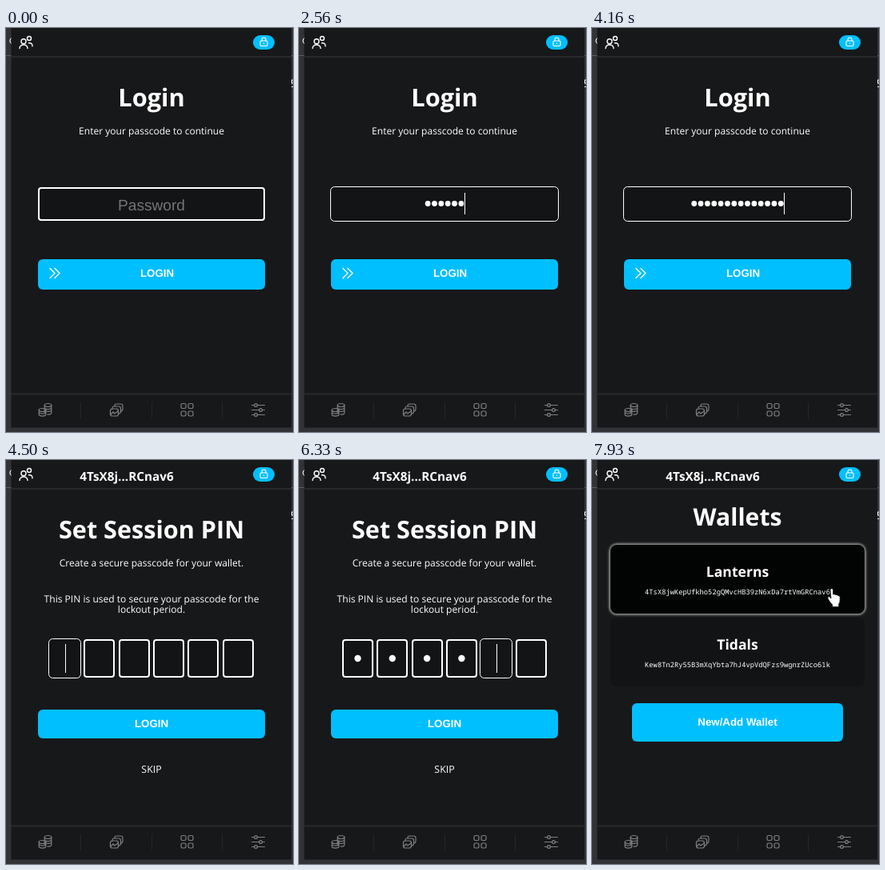
An HTML page that plays this animation: 359 px wide and 505 px high, repeating every 8000 ms.

```html
<!DOCTYPE html>
<html lang="en">
<head>
<meta charset="utf-8">
<title>Wallet login</title>
<style>
  html, body { margin: 0; width: 100%; height: 100%; overflow: hidden; background: #323337; }
  svg { display: block; }
  text { fill: #fff; text-anchor: middle; text-rendering: geometricPrecision; font: 12.07px "Open Sans", sans-serif; }
  .title { font-weight: 700; font-size: 30.8px; }
  .name { font-weight: 700; font-size: 17.6px; }
  .account { font-weight: 700; font-size: 15.3px; }
  .key { font: 500 8.79px "Noto Sans Mono", monospace; }
  .label { font: 700 13.33px "Liberation Sans", Arial, sans-serif; }
  .hint { font: 19.1px "Liberation Sans", Arial, sans-serif; fill: #757575; }
  .button { fill: #00bfff; }
  .line { fill: none; stroke: #fff; stroke-width: 1.4; stroke-linecap: round; stroke-linejoin: round; }
  .thin { stroke-width: 1.1; }
  .nav { stroke: #808080; stroke-width: 1.2; }
  .field { fill: #131416; stroke: #fff; stroke-width: 2; }
  .card { fill: #121315; }
  .dot, .caret { fill: #fff; }
  .cursor { fill: #fff; stroke: #111; stroke-width: .8; stroke-linejoin: round; }
</style>
</head>
<body>
<svg width="359" height="505" viewBox="0 0 359 505">
  <defs>
    <filter id="blur" x="-10%" y="-20%" width="120%" height="140%"><feGaussianBlur stdDeviation="1.5"/></filter>
  </defs>

  <rect width="359" height="505" fill="#323337"/>
  <rect y="34" width="359" height="1" fill="#5c5d60"/>
  <path class="line thin" d="M7 12.500a4 4 0 0 0 0 7M360 65h-2.500v4h2.500M357.500 73.500h2.500"/>
  <rect x="6.500" width="350.500" height="499.500" fill="#17181a"/>
  <path d="M7 36h350M7 457.500h350" stroke="#28292b" stroke-width="2"/>
  <path d="M93.500 468v20M182.500 468v20M270.500 468v20" stroke="#252628"/>

  <g class="line">
    <circle cx="22" cy="16.700" r="3"/>
    <path d="M17 25.500c0-6 10-6 10 0"/>
    <circle cx="29" cy="13" r="2.500"/>
    <path d="M28.500 18.800c3-.5 4.500 1.200 4.500 4"/>
  </g>
  <rect class="button" x="309" y="9" width="27" height="18" rx="9"/>
  <g class="line thin">
    <rect x="318" y="16" width="9" height="6.500" rx="1.500"/>
    <path d="M320 16v-1.500a2.500 2.500 0 0 1 5 0v1.500M322.500 19v.5"/>
  </g>

  <g class="line nav">
    <ellipse cx="52.500" cy="471.500" rx="4.300" ry="2"/>
    <path d="M48.200 471.500v9M56.800 471.500v9.500c0 2-3 2.500-5 2M48.200 475c1 2 7.600 2 8.600 0M50 479c2 .8 6 .5 6.800-1"/>
    <ellipse cx="45.500" cy="477.500" rx="4.300" ry="2"/>
    <path d="M41.200 477.500v5.500c0 2.700 8.600 2.700 8.600 0v-5.500M41.200 480.500c1 2 7.600 2 8.600 0"/>
    <rect x="130.500" y="476" width="10" height="9" rx="2.500"/>
    <path d="M133 476v-1a2 2 0 0 1 2-2h6a2.500 2.500 0 0 1 2.500 2.500v4a2.500 2.500 0 0 1-3 2.500M136 473v-1a2 2 0 0 1 2-2h5.500a2.500 2.500 0 0 1 2.500 2.500v4a2.500 2.500 0 0 1-2.500 2.500M131 483l3-3 2 2 4-3"/>
    <rect x="219" y="469.500" width="6" height="6" rx="1.700"/>
    <rect x="228" y="469.500" width="6" height="6" rx="1.700"/>
    <rect x="219" y="479" width="6" height="6" rx="1.700"/>
    <rect x="228" y="479" width="6" height="6" rx="1.700"/>
    <path d="M307.500 471.500h3m4 0h9M307.500 477.500h9m4 0h3M307.500 483.500h3m4 0h9"/>
    <circle cx="312.500" cy="471.500" r="1.900"/>
    <circle cx="318.500" cy="477.500" r="1.900"/>
    <circle cx="312.500" cy="483.500" r="1.900"/>
  </g>

  <text id="account" class="account" x="151" y="26">4TsX8j...RCnav6</text>

  <g id="login">
    <text class="title" x="182" y="98">Login</text>
    <text x="182" y="133">Enter your passcode to continue</text>
    <rect id="field" class="field"/>
    <text id="hint" class="hint" x="182" y="228">Password</text>
    <g id="secret"></g>
    <rect id="fieldCaret" class="caret" y="206" width="1" height="27"/>
    <rect class="button" x="40" y="289" width="284" height="38" rx="6"/>
    <path class="line" d="M55 300.500l6 6-6 6M61 300.500l6 6-6 6"/>
    <text class="label" x="189" y="311">LOGIN</text>
  </g>

  <g id="pin">
    <text class="title" style="font-size:30.6px" x="182" y="98">Set Session PIN</text>
    <text x="182" y="133">Create a secure passcode for your wallet.</text>
    <text x="182" y="178">This PIN is used to secure your passcode for the</text>
    <text x="182" y="191">lockout period.</text>
    <g id="cells"></g>
    <rect id="pinCaret" class="caret" y="230" width="1" height="36"/>
    <rect class="button" x="40" y="312" width="284" height="36" rx="6"/>
    <text class="label" x="182" y="334">LOGIN</text>
    <text style="font-size:12.4px" x="182" y="391">SKIP</text>
  </g>

  <g id="wallets">
    <text class="title" style="font-size:30.1px" x="182" y="82">Wallets</text>
    <rect class="card" x="23" y="106" width="318" height="86" rx="8"/>
    <g id="hover">
      <rect x="23" y="106" width="318" height="86" rx="8" fill="none" stroke="#ccc" stroke-width="2.500" filter="url(#blur)"/>
      <rect x="23" y="106" width="318" height="86" rx="8" fill="#020303"/>
    </g>
    <text class="name" x="182" y="146">Lanterns</text>
    <text class="key" x="182" y="168">4TsX8jwKepUfkho52gQMvcHB39zN6xDa7rtVmGRCnav6</text>
    <rect class="card" x="23" y="197" width="318" height="86" rx="8"/>
    <text class="name" x="182" y="237">Tidals</text>
    <text class="key" x="182" y="259">Kew8Tn2Ry55B3mXqYbta7hJ4vpVdQFzs9wgnrZUco61k</text>
    <rect class="button" x="50" y="304" width="264" height="48" rx="6"/>
    <text class="label" x="182" y="332">New/Add Wallet</text>
  </g>

  <g class="cursor">
    <path id="arrow" d="M0 0v17l4-4 3 7 3-1.300-3-6.700h5.500z"/>
    <path id="hand" d="M-1.500 1.500a1.800 1.800 0 0 1 3.600 0V7q1.700-.6 3 .5 2-.4 3 1 2.400-.2 2.600 2V14q0 3-1.500 5v3.500h-8V20q-3-3-5.500-7.500-1-2.500 1-2.800 1.400 0 2.800 2.300z"/>
    <path id="beam" d="M-3-9h2.500L0-8.500.500-9H3v1H.6V8H3v1H.500L0 8.500-.5 9H-3V8h2.400V-8H-3z" stroke="none"/>
  </g>
</svg>

<script>
  const LOOP = 8000;
  const CENTER = 182;
  const DOT_PITCH = 8.35;
  const CELL_PITCH = 43.3;
  const PIN_START = 4500, WALLETS_START = 6850;

  const keyTimes = [1900, 2070, 2240, 2400, 2480, 2560, 2640, 2810, 2970, 3490, 3660, 3910, 4080, 4160];
  // Steps alternate: a digit is typed, then focus moves to the next cell.
  const pinTimes = [5510, 5580, 5660, 5740, 5900, 5990, 6240, 6330, 6500, 6580, 6750];
  const cursorSteps = [
    [330, 'hand', 297, 291], [410, 'arrow', 283, 267], [490, 'arrow', 268, 243],
    [570, 'beam', 260, 222], [650, 'beam', 257, 212], [980],
    [7760, 'arrow', 341, 204], [7840, 'hand', 316, 179], [7930, 'hand', 299.5, 161]
  ];

  const $ = id => document.getElementById(id);
  const set = (node, attrs) => { for (const k in attrs) node.setAttribute(k, attrs[k]); };
  const show = (node, on) => { node.style.display = on ? '' : 'none'; };
  const passed = (times, t) => times.filter(time => time <= t).length;

  function add(parent, tag, attrs) {
    const node = document.createElementNS(parent.namespaceURI, tag);
    set(node, attrs);
    return parent.appendChild(node);
  }

  function frameField(node, x, y, w, h, focused) {
    const grow = focused ? 0.5 : -1;
    set(node, { x: x - grow, y: y - grow, width: w + 2 * grow, height: h + 2 * grow, rx: focused ? 5 : 3 });
    node.style.strokeWidth = focused ? 1 : 2;
  }

  const secret = keyTimes.map(() => add($('secret'), 'circle', { class: 'dot', cy: 219.5, r: 3.4 }));
  const cells = Array.from({ length: 6 }, (_, i) => {
    const x = 54.7 + CELL_PITCH * i;
    return {
      x,
      box: add($('cells'), 'rect', { class: 'field' }),
      dot: add($('cells'), 'circle', { class: 'dot', cx: x + 18.8, cy: 248, r: 4.2 })
    };
  });

  function drawLogin(t) {
    const focused = t >= 810;
    const count = passed(keyTimes, t);
    const half = count * DOT_PITCH / 2;
    frameField($('field'), 40, 199, 284, 42, focused);
    show($('hint'), !count);
    secret.forEach((dot, i) => {
      show(dot, i < count);
      set(dot, { cx: CENTER - half + (i + 0.5) * DOT_PITCH });
    });
    set($('fieldCaret'), { x: Math.round(CENTER + half - 0.5) });
    show($('fieldCaret'), focused && (t < 1310 || count));
  }

  function drawPin(t) {
    const step = passed(pinTimes, t);
    const focus = Math.floor(step / 2);
    const filled = Math.ceil(step / 2);
    cells.forEach(({ x, box, dot }, i) => {
      frameField(box, Math.round(x - 0.7), 224, 39, 48, i === focus);
      show(dot, i < filled);
    });
    set($('pinCaret'), { x: Math.round(cells[focus].x + (filled > focus ? 24.4 : 19.3)) });
    show($('pinCaret'), t < 5080 || step);
  }

  function drawCursor(t) {
    const [, kind, x, y] = cursorSteps[passed(cursorSteps.map(s => s[0]), t) - 1] || [];
    for (const id of ['arrow', 'hand', 'beam']) {
      show($(id), id === kind);
      if (id === kind) set($(id), { transform: `translate(${x} ${y})` });
    }
  }

  function draw(now) {
    const t = now % LOOP;
    show($('account'), t >= PIN_START);
    show($('login'), t < PIN_START);
    show($('pin'), t >= PIN_START && t < WALLETS_START);
    show($('wallets'), t >= WALLETS_START);
    if (t < PIN_START) drawLogin(t);
    else if (t < WALLETS_START) drawPin(t);
    $('hover').style.opacity = t < 7840 ? 0 : t < 7930 ? 0.5 : 1;
    drawCursor(t);
    requestAnimationFrame(draw);
  }
  draw(0);
</script>
</body>
</html>
```
